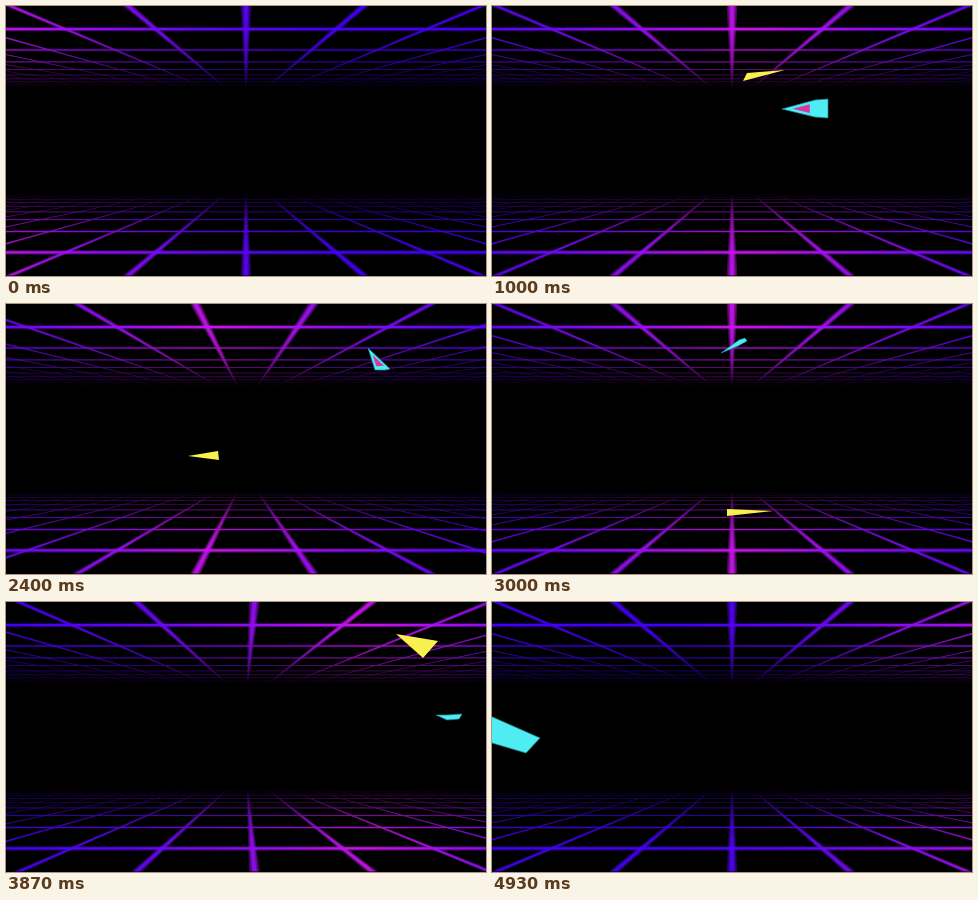
Write an HTML page that moves like this. It is 480x270 px and loops after 4990 ms.

```html
<!DOCTYPE html>
<html lang="en">
<head>
<meta charset="utf-8">
<title>Neon grid flight</title>
<style>
  html, body { margin: 0; width: 100%; height: 100%; overflow: hidden; background: #000; }
  svg { display: block; width: 100vw; height: 100vh; }
</style>
</head>
<body>
<svg viewBox="0 0 480 270">
  <defs>
    <linearGradient id="light" gradientUnits="userSpaceOnUse" x1="-350" x2="350" y1="0" y2="0">
      <stop offset="0" stop-color="#4400f2"/>
      <stop offset=".17" stop-color="#6006f2"/>
      <stop offset=".35" stop-color="#960eee"/>
      <stop offset=".5" stop-color="#c814e8"/>
      <stop offset=".65" stop-color="#960eee"/>
      <stop offset=".83" stop-color="#6006f2"/>
      <stop offset="1" stop-color="#4400f2"/>
    </linearGradient>
    <linearGradient id="fade" gradientUnits="userSpaceOnUse" x1="0" x2="0" y1="0" y2="82">
      <stop offset="0" stop-color="#fff"/>
      <stop offset=".35" stop-color="#fff"/>
      <stop offset=".68" stop-color="#fff" stop-opacity=".72"/>
      <stop offset=".88" stop-color="#fff" stop-opacity=".38"/>
      <stop offset="1" stop-color="#fff" stop-opacity="0"/>
    </linearGradient>
    <mask id="depth" maskUnits="userSpaceOnUse" x="0" y="0" width="480" height="90">
      <rect width="480" height="90" fill="url(#fade)"/>
    </mask>
  </defs>
  <rect width="480" height="270"/>
  <g id="ceiling" mask="url(#depth)" fill="url(#light)">
    <path id="rails0" opacity=".35"/>
    <path id="rails1" opacity=".5"/>
    <path id="rails2" opacity=".85"/>
    <path id="rungs0" opacity=".35"/>
    <path id="rungs1"/>
  </g>
  <use href="#ceiling" transform="matrix(1 0 0 -1 0 269.5)"/>
  <polygon id="yellow" fill="#f8f04c"/>
  <polygon id="cyan" fill="#50ecf4" stroke="#1c8c9c" stroke-width=".7"/>
  <polygon id="core" fill="#d8389c"/>
</svg>
<script>
const LOOP = 4990, STEP = 1000 / 15;
const VANISH = 99, SPACING = 1.19;
const el = id => document.getElementById(id);
const mix = (a, b, u) => a + (b - a) * u;

// Each key: time, core opacity, then outline points beginning with the nose.
const cyanKeys = [
  [0, 1, 600, 130, 640, 115, 670, 114, 670, 146, 640, 145],
  [1000, 1, 290, 103, 323, 94, 336, 93, 336, 112, 323, 111],
  [1867, 1, 288, 210, 252, 217, 251, 221, 251, 226, 252, 230],
  [2400, 1, 362, 44, 384, 65, 379, 66, 374, 66, 369, 66],
  [3000, 0, 229, 49, 247, 36, 253, 34, 255, 37, 246, 42],
  [3867, 0, 430, 113, 441, 113, 456, 112, 453, 117, 441, 118],
  [4933, 0, -70, 98, -20, 106, 48, 136, 34, 151, -30, 132]
].map(makeKey);
const yellowKeys = [
  [0, 0, -110, 130, -160, 118, -160, 140],
  [1000, 0, 293, 64, 255, 67, 251, 75],
  [1867, 0, 311, 170, 345, 151, 347, 156],
  [2400, 0, 182, 152, 212, 147, 213, 156],
  [3000, 0, 281, 207, 235, 205, 235, 212],
  [3867, 0, 390, 32, 432, 39, 417, 56],
  [4933, 0, 640, 60, 690, 50, 690, 75]
].map(makeKey);

function rotate([x, y], a) {
  const c = Math.cos(a), s = Math.sin(a);
  return [x * c - y * s, x * s + y * c];
}

function makeKey([time, core, ...flat]) {
  const pts = [];
  for (let i = 0; i < flat.length; i += 2) pts.push([flat[i], flat[i + 1]]);
  const center = [0, 1].map(d => pts.reduce((sum, p) => sum + p[d], 0) / pts.length);
  const rel = pts.map(p => [p[0] - center[0], p[1] - center[1]]);
  const angle = Math.atan2(rel[0][1], rel[0][0]);
  return { time, core, center, angle, shape: rel.map(p => rotate(p, -angle)) };
}

// The path leaves and reaches every key along the ship's heading.
function glide(a, b, u, span) {
  const u2 = u * u, u3 = u2 * u, push = 0.2 * span;
  const dir = k => [Math.cos(k.angle) * push, Math.sin(k.angle) * push];
  const va = dir(a), vb = dir(b);
  return [0, 1].map(d =>
    (2 * u3 - 3 * u2 + 1) * a.center[d] + (u3 - 2 * u2 + u) * va[d] +
    (3 * u2 - 2 * u3) * b.center[d] + (u3 - u2) * vb[d]);
}

function pose(keys, t) {
  let i = 0;
  while (i < keys.length - 2 && t >= keys[i + 1].time) i++;
  const a = keys[i], b = keys[i + 1], span = b.time - a.time;
  const u = Math.min(1, (t - a.time) / span);
  const center = glide(a, b, u, span);
  const turn = Math.atan2(Math.sin(b.angle - a.angle), Math.cos(b.angle - a.angle));
  const pts = a.shape.map((p, j) => {
    const q = rotate([mix(p[0], b.shape[j][0], u), mix(p[1], b.shape[j][1], u)], a.angle + turn * u);
    return [q[0] + center[0], q[1] + center[1]];
  });
  return { pts, center, core: mix(a.core, b.core, u) };
}

const setPoints = (id, pts) =>
  el(id).setAttribute("points", pts.map(p => p.map(v => v.toFixed(2)).join()).join(" "));

function rails(shift, half) {
  const near = VANISH + 1, far = 15;
  let d = "";
  for (let k = -17; k <= 18; k++) {
    const x = (k - shift) * SPACING;
    const at = (depth, side) => `${(240 + (x + side * half) * depth).toFixed(2)} ${VANISH - depth}`;
    d += `M${at(near, -1)}L${at(near, 1)}L${at(far, 1)}L${at(far, -1)}Z`;
  }
  return d;
}

function rungs(thickness) {
  let d = "";
  for (let k = 0; k < 9; k++) {
    const depth = 199 / (2.62 + k);
    const h = Math.max(0.6, thickness * (depth / 76) ** 2);
    d += `M0 ${VANISH - depth - h / 2}h480v${h}h-480z`;
  }
  return d;
}

el("rungs0").setAttribute("d", rungs(4.6));
el("rungs1").setAttribute("d", rungs(2.2));

function draw(ms) {
  const t = Math.floor((ms + 5) / STEP) * STEP;
  // One rail spacing per second, with the wrapped pose shown twice.
  const shift = Math.min(1, ((t + 0.01) % 1000) / (14 * STEP)) % 1;
  [0.055, 0.038, 0.02].forEach((half, i) => el("rails" + i).setAttribute("d", rails(shift, half)));

  const yellow = pose(yellowKeys, t), cyan = pose(cyanKeys, t);
  setPoints("yellow", yellow.pts);
  setPoints("cyan", cyan.pts);

  const [nose, left, , , right] = cyan.pts;
  const tri = [nose, left, right];
  const mid = [0, 1].map(d => tri.reduce((sum, p) => sum + p[d], 0) / 3);
  setPoints("core", tri.map(p => [mix(mid[0], p[0], 0.52), mix(mid[1], p[1], 0.52)]));
  el("core").setAttribute("opacity", cyan.core);

  const glowX = 240 + (yellow.center[0] - 240) * 0.7;
  el("light").setAttribute("gradientTransform", `translate(${glowX.toFixed(2)} 0)`);
}

const start = performance.now();
function tick() {
  draw((performance.now() - start) % LOOP);
  requestAnimationFrame(tick);
}
tick();
</script>
</body>
</html>
```
